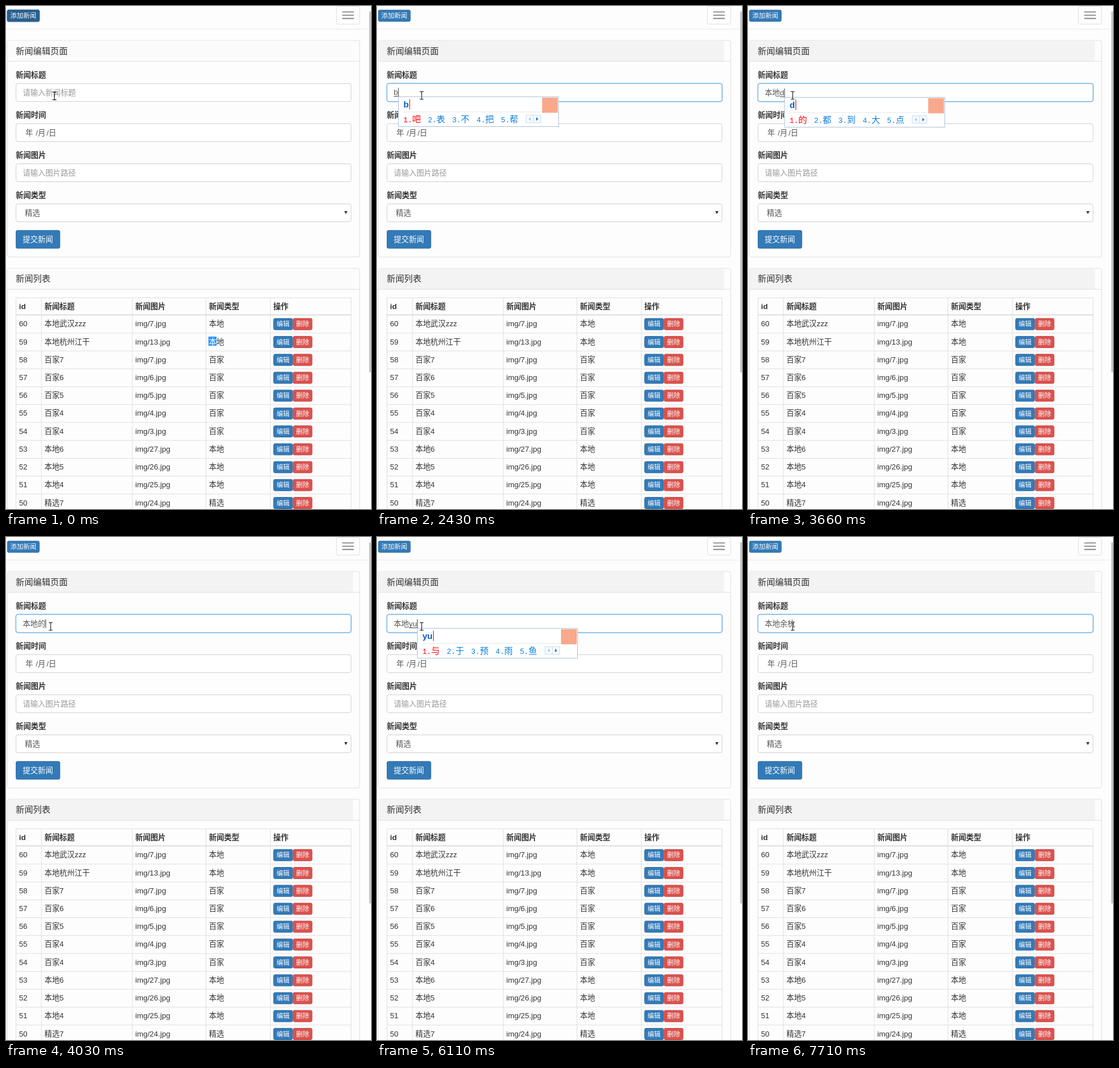
Animation, 638 px wide and 878 px high, one loop 8 s. Source, as an HTML page:

```html
<!DOCTYPE html>
<html lang="zh-CN">
<head>
<meta charset="utf-8">
<style>
html, body { margin: 0; width: 100%; height: 100%; overflow: hidden; background: #fdfdfd; }
svg { display: block; }
text { font: 14px "Liberation Sans", "Noto Sans CJK SC", "Noto Sans CJK", sans-serif; fill: #333; white-space: pre; }
.b { font-weight: bold; }
.title { font-size: 16px; }
.small { font-size: 12px; fill: #fff; }
.white { fill: #fff; }
.hint { fill: #999; }
.field { fill: #555; }
.spell { font-size: 16px; font-weight: bold; fill: #0a5cc4; }
.cand { font-size: 16px; font-weight: 300; fill: #0a80dc; }
.first { fill: #f00; }
.mono { font: 13.33px "Liberation Mono", monospace; }
</style>
</head>
<body>
<!-- the page is laid out in its own pixels and shown at 94.6 % -->
<svg id="stage" width="638" height="878" viewBox="0 0 674.42 928.12"></svg>
<script>
const LOOP = 8000;
const FONT = '"Liberation Sans", sans-serif';
const pen = document.createElement('canvas').getContext('2d');
const stage = document.getElementById('stage');

const measure = (s, font) => { pen.font = `${font} ${FONT}`; return pen.measureText(s).width; };
const text = (x, y, s, cls = '') => `<text x="${x}" y="${y}" class="${cls}">${s}</text>`;
const rect = (x, y, w, h, fill, extra = '') =>
  `<rect x="${x}" y="${y}" width="${w}" height="${h}" fill="${fill}" ${extra}/>`;
const box = (x, y, w, h, fill, line, r = 3.5) => rect(x + .5, y + .5, w - 1, h - 1, fill, `stroke="${line}" rx="${r}"`);
const path = (d, extra) => `<path d="${d}" ${extra}/>`;
const button = (x, y, w, h, fill, line, s, pad, base, cls) =>
  box(x, y, w, h, fill, line, 2.5) + text(x + pad, y + base, s, cls);

// start time, committed text, letters being spelled, candidates, caret shown
const steps = [
  [0, '', '', '', 0], [160, '', '', '', 0], [310, '', '', '', 1], [430, '', '', '', 1],
  [560, '', '', '', 1], [990, '', '', '', 0], [1420, '', '', '', 1], [1970, '', '', '', 0],
  [2430, '', 'b', '吧 表 不 把 帮', 1],
  [2710, '', 'be', '被 北 别的 倍 背', 1],
  [2860, '', 'ben', '本 笨 奔 苯 锛', 1],
  [3140, '', "ben'd", '本地 本店 笨蛋 本大 奔到', 1],
  [3260, '', "ben'di", '本地 本底 本 笨 bending', 1],
  [3510, '本地', '', '', 1],
  [3660, '本地', 'd', '的 都 到 大 点', 1],
  [3910, '本地', 'de', '的 得 德 地 嘚', 1],
  [4030, '本地的', '', '', 1],
  [4310, '本地', '', '', 1], [4580, '本地', '', '', 0], [4980, '本地', '', '', 1],
  [5120, '本地', 'q', '去 区 群 七 取', 1],
  [5530, '本地', '', '', 1],
  [5960, '本地', 'y', '有 一 要 也 用', 1],
  [6110, '本地', 'yu', '与 于 预 雨 鱼', 1],
  [6540, '本地', "yu'h", '余杭 雨后 与会 预划 愈合', 1],
  [6690, '本地', "yu'ha", '余杭 雨害 遇害 与 鱼蛤', 1],
  [6850, '本地', "yu'han", '余杭 余寒 雨寒 玉函 语汉', 1],
  [6990, '本地', "yu'hang", '余杭 雨航 与行 宇航 预航', 1],
  [7110, '本地余杭', '', '', 1], [7710, '本地余杭', '', '', 0],
];

const rows = [
  ['本地武汉zzz', 7, '本地'], ['本地杭州江干', 13, '本地'], ['百家7', 7, '百家'], ['百家6', 6, '百家'],
  ['百家5', 5, '百家'], ['百家4', 4, '百家'], ['百家4', 3, '百家'], ['本地6', 27, '本地'],
  ['本地5', 26, '本地'], ['本地4', 25, '本地'], ['精选7', 24, '精选'],
];
const cols = [18, 65, 233, 369, 488, 637];
const fieldY = i => 142.6 + i * 74;

function navbar(active) {
  return rect(0, 42, 669, 1, '#e7e7e7')
    + (active ? box(1, 6, 62, 24, 'none', '#8fb8de') : '')
    + button(2, 7, 60, 22, active ? '#286090' : '#337ab7', active ? '#204d74' : '#2e6da4', '添加新闻', 6, 15.4, 'small')
    + box(610, 0, 44, 34, 'none', '#ddd')
    + [10, 16, 22].map(y => rect(621, y, 22, 2, '#888', 'rx="1"')).join('')
    + rect(671, 10, 4, 666, '#c6c6c6');
}

function panel(y, h, title, active) {
  return box(2, y, 652, h, 'none', '#ddd')
    + rect(3, y + 1, 638, 38, active ? '#fbfbfb' : '#f3f3f3', 'rx="2"')
    + rect(3, y + 38.6, 650, 1, '#ddd')
    + text(18, y + 25.3, title, 'title');
}

function form() {
  const labels = ['新闻标题', '新闻时间', '新闻图片', '新闻类型'];
  return labels.map((s, i) => text(18, fieldY(i) - 10.2, s, 'b') + box(18, fieldY(i), 620, 34, '#fff', '#ccc')).join('')
    + [[36, '年'], [55, '/月'], [75, '/日']].map(([x, s]) => text(x, fieldY(1) + 22, s, 'field')).join('')
    + text(31, fieldY(2) + 22, '请输入图片路径', 'hint')
    + text(35, fieldY(3) + 22.5, '精选', 'field')
    + path('M625 378.5h6l-3 5.5z', 'fill="#333"')
    + button(18, 413.6, 82, 34, '#337ab7', '#2e6da4', '提交新闻', 13, 22, 'white');
}

function table(selected) {
  let s = ['id', '新闻标题', '新闻图片', '新闻类型', '操作'].map((h, i) => text(cols[i] + 6, 559, h, 'b')).join('');
  s += cols.map(x => rect(x, 538, 1, 391, '#ddd')).join('');
  s += rect(18, 538, 620, 1, '#ddd') + rect(18, 569, 620, 2, '#ddd');
  rows.forEach(([title, img, type], i) => {
    const y = 571 + i * 33;
    s += rect(18, y + 32, 620, 1, '#ddd');
    [60 - i, title, `img/${img}.jpg`, type].forEach((c, k) => s += text(cols[k] + 6, y + 20.3, c));
    s += button(494, y + 5, 36, 22, '#337ab7', '#2e6da4', '编辑', 6, 15.4, 'small')
      + button(530, y + 5, 36, 22, '#d9534f', '#d43f3a', '删除', 6, 15.4, 'small');
  });
  if (selected) s += rect(374, 610, 15, 17, '#39f') + text(375, 624.3, '本', 'white');
  return s;
}

function popup(left, dy, spell, words) {
  const x = left + 10, y = 167 + dy;
  let end = x, list = '';
  words.split(' ').forEach((w, i) => {
    const latin = /^\w+$/.test(w);
    list += text(end, y + 47.5, `<tspan class="mono">${i + 1}.${latin ? w : ''}</tspan>${latin ? '' : w}`, i ? 'cand' : 'cand first');
    end += 16 + w.length * (latin ? 8 : 16) + 13;
  });
  const ax = end + 1, right = ax + 61;
  return box(left, y, right - left, 56, '#fff', '#a9bdd3', 0)
    + text(x, y + 20, spell, 'spell')
    + rect(x + measure(spell, 'bold 16px') + 1, y + 5, 1.2, 19, '#f00')
    + rect(x, y + 28, right - 32 - x, 1, '#dfe5ec')
    + rect(right - 31, y + 2, 29, 28, '#f9a88c')
    + list
    + box(ax, y + 34, 28, 15, '#f8fbfe', '#c5daee', 0) + rect(ax + 13.5, y + 35, 1, 13, '#c5daee')
    + path(`M${ax + 9} ${y + 38}v7l-4-3.5z`, 'fill="#a9c4dc"')
    + path(`M${ax + 19} ${y + 38}v7l4-3.5z`, 'fill="#0a78d0"');
}

function titleField(focus, done, spell, words, caret) {
  const dy = done ? 1 : 0, letters = spell.replace("'", '');
  const start = 31 + done.length * 14, end = Math.ceil(start + measure(letters, '14px'));
  const y = fieldY(0);
  let s = '';
  if (focus) s += `<g opacity="${focus}">`
    + rect(17.5, y - .5, 621, 35, 'none', 'stroke="#66afe9" stroke-opacity=".3" stroke-width="2" rx="5"')
    + box(18, y, 620, 34, 'none', '#66afe9') + '</g>';
  s += done || spell ? text(31, y + 21.6 + dy, done + letters, 'field') : text(31, y + 22, '请输入新闻标题', 'hint');
  if (spell) s += rect(start, 166 + dy, end - start, 1, '#333');
  if (caret) s += rect(end, 151 + dy, 1, 16, '#333');
  return spell ? s + popup(end, dy, spell, words) : s;
}

const pointer = (x, y) => path(`M${x - 3.5} ${y - 7}h3l.5 .5l.5 -.5h3M${x} ${y - 6.5}v13M${x - 3.5} ${y + 7}h3l.5 -.5l.5 .5h3`,
  'fill="none" stroke="#111" stroke-width="1.2"');

function draw(i) {
  const [time, done, spell, words, caret] = steps[i];
  const idle = time < 310;
  const focus = idle ? 0 : time < 430 ? .4 : time < 560 ? .8 : 1;
  stage.innerHTML = rect(0, 0, 675, 929, '#fdfdfd') + navbar(idle)
    + panel(63, 400.6, '新闻编辑页面', idle) + form()
    + panel(483.6, 460, '新闻列表', idle) + table(idle)
    + titleField(focus, done, spell, words, caret)
    + (time < 160 ? pointer(89.5, 166) : idle ? pointer(84.5, 166) : pointer(82.5, 165));
}

let shown = -1;
function tick() {
  const t = performance.now() % LOOP;
  const i = steps.findLastIndex(s => s[0] <= t);
  if (i !== shown) draw(shown = i);
  requestAnimationFrame(tick);
}
tick();
</script>
</body>
</html>
```
